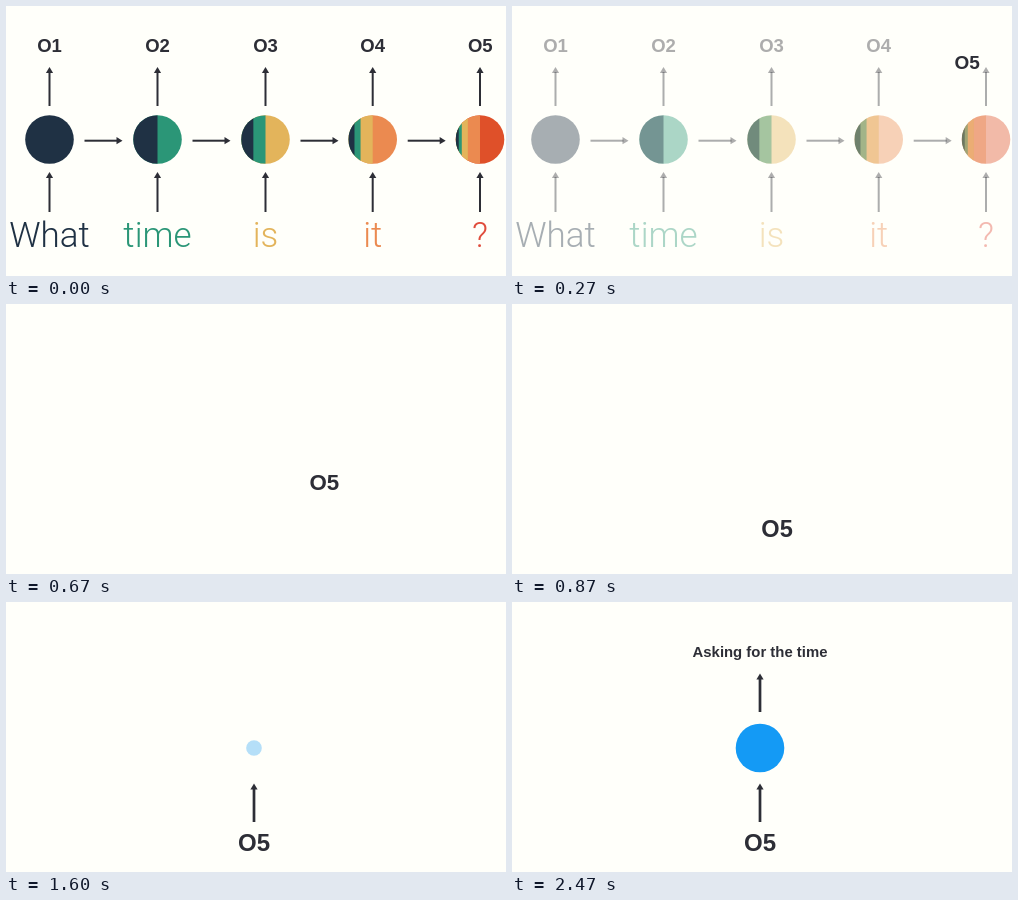
An HTML page with a canvas that plays this animation: 500 px wide and 270 px high, repeating every 2600 ms.

```html
<!DOCTYPE html>
<html lang="en">
<head>
<meta charset="utf-8">
<title>Recurrent network</title>
<style>
  html, body { margin: 0; width: 100%; height: 100%; overflow: hidden; background: #fffffa; }
  canvas { display: block; }
</style>
</head>
<body>
<canvas id="stage" width="500" height="270"></canvas>
<script>
const ctx = document.getElementById('stage').getContext('2d');
const LOOP = 2600;
const INK = '#2d2e36';
const COLORS = ['#1f3144', '#2b9677', '#e3b45b', '#eb8a50', '#df5029'];
const WORDS = ['What', 'time', 'is', 'it', '?'];
const CENTERS = [43.5, 151.5, 259.5, 366.7, 474];
const RADIUS = 24.3;

const progress = (t, start, end) => Math.min(1, Math.max(0, (t - start) / (end - start)));
const easeInOut = p => p < 0.5 ? 2 * p * p : 1 - 2 * (1 - p) * (1 - p);
const mix = (a, b, p) => a + (b - a) * p;

function label(text, x, y, size) {
  ctx.font = `bold ${size}px "Liberation Sans", Arial, sans-serif`;
  ctx.fillStyle = INK;
  ctx.fillText(text, x, y + size * 0.355);
}

function arrow(x, y, length, angle, width) {
  const head = 6, half = 3.6;
  if (length <= 0) return;
  ctx.save();
  ctx.translate(x, y);
  ctx.rotate(angle);
  ctx.fillStyle = INK;
  ctx.fillRect(0, -width / 2, Math.max(0, length - head + 1), width);
  ctx.beginPath();
  ctx.moveTo(length, 0);
  ctx.lineTo(length - head, -half);
  ctx.lineTo(length - head, half);
  ctx.fill();
  ctx.restore();
}

const arrowUp = (x, y, length, width) => arrow(x, y, length, -Math.PI / 2, width);

function disc(x, y, r, color) {
  ctx.beginPath();
  ctx.arc(x, y, r, 0, Math.PI * 2);
  ctx.fillStyle = color;
  ctx.fill();
}

// Each older colour keeps half the width of the one after it.
function cell(index) {
  const x = CENTERS[index], y = 133.5;
  disc(x, y, RADIUS, COLORS[index]);
  ctx.save();
  ctx.clip();
  for (let i = index - 1; i >= 0; i--) {
    ctx.fillStyle = COLORS[i];
    ctx.fillRect(x - RADIUS, y - RADIUS, 2 * RADIUS / 2 ** (index - i), 2 * RADIUS);
  }
  ctx.restore();
}

function network() {
  CENTERS.forEach((x, i) => {
    cell(i);
    arrowUp(x, 100, 39, 2);
    arrowUp(x, 206, 40, 2);
    if (i < 4) {
      label('O' + (i + 1), x, 39.7, 18.5);
      arrow(x + 35, 134.7, 38, 0, 2);
    }
    ctx.font = '300 35px Roboto, sans-serif';
    ctx.fillStyle = i === 4 ? '#e04c3c' : COLORS[i];
    ctx.fillText(WORDS[i], x, 241);
  });
}

function answer(t) {
  arrowUp(248, 220, 38.5 * easeInOut(progress(t, 1100, 1530)), 2.7);

  const grow = progress(t, 1530, 1750);
  ctx.globalAlpha = Math.min(1, grow * 0.65 + grow * grow);
  disc(248, 146, RADIUS * grow, '#149af5');
  ctx.globalAlpha = 1;

  arrowUp(248, 110, 38.5 * easeInOut(progress(t, 1730, 1890)), 2.7);

  ctx.globalAlpha = progress(t, 1850, 1995);
  label('Asking for the time', 248, 50, 14.9);
  ctx.globalAlpha = 1;
}

function draw(now) {
  const t = now % LOOP;
  ctx.fillStyle = '#fffffa';
  ctx.fillRect(0, 0, 500, 270);
  ctx.textAlign = 'center';

  ctx.globalAlpha = 1 - progress(t, 70, 400);
  network();
  ctx.globalAlpha = 1;

  const move = easeInOut(progress(t, 65, 1065));
  label('O5', mix(474.3, 248, move), mix(39.7, 240, move), mix(18.5, 24, move));
  answer(t);
}

const start = performance.now();
function tick() {
  draw(performance.now() - start);
  requestAnimationFrame(tick);
}
tick();
</script>
</body>
</html>
```
